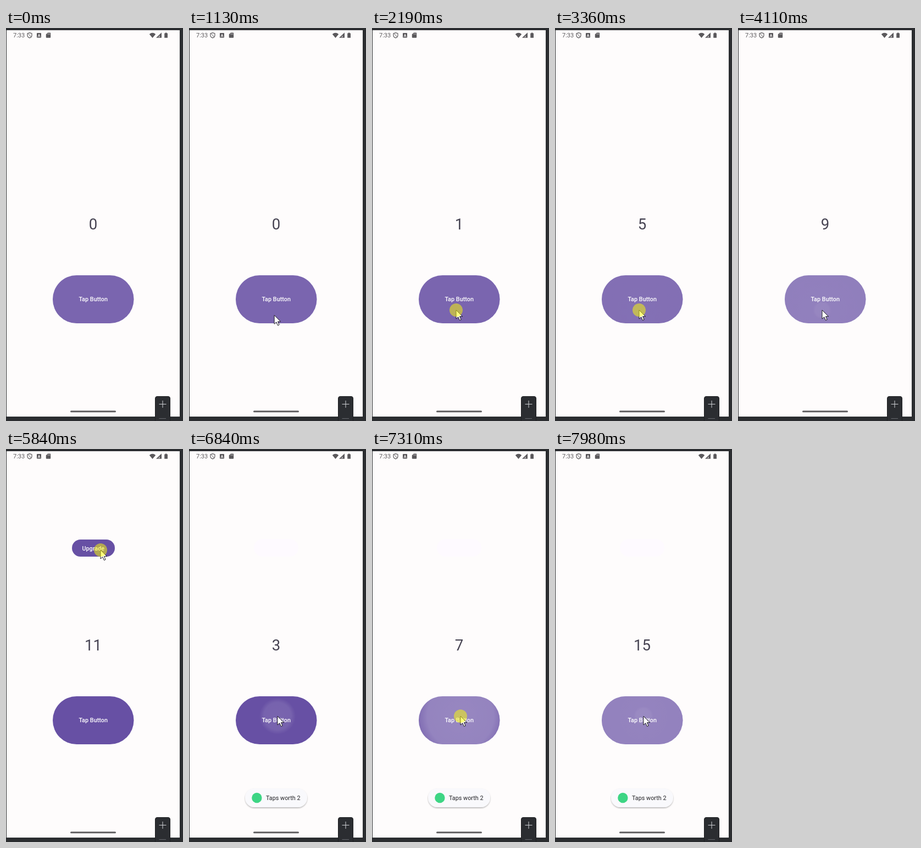
Write an HTML page that moves like this. It is 322 px wide and 712 px high and loops after 8000 ms.

```html
<!DOCTYPE html>
<html lang="en">
<head>
<meta charset="utf-8">
<title>Tap counter</title>
<style>
  html, body { margin: 0; width: 100%; height: 100%; overflow: hidden; background: #2b2d30; }
  svg { display: block; width: 322px; height: 712px; }
  text { font-family: Roboto, "Open Sans", sans-serif; }
  .label { font-size: 10.7px; font-weight: 500; letter-spacing: .08px; fill: #fff; text-anchor: middle; }
  #count { font-size: 27.6px; fill: #464352; text-anchor: middle; }
  .status { fill: #5b595c; }
</style>
</head>
<body>
<svg viewBox="0 0 322 712">
  <defs>
    <radialGradient id="glow">
      <stop offset="0" stop-color="#fff"/>
      <stop offset=".75" stop-color="#fff" stop-opacity=".9"/>
      <stop offset="1" stop-color="#fff" stop-opacity="0"/>
    </radialGradient>
    <clipPath id="tapClip"><rect x="85" y="448" width="147.5" height="87" rx="43.5"/></clipPath>
    <clipPath id="upClip"><rect x="120" y="164" width="78" height="31" rx="15.5"/></clipPath>
    <filter id="shadow" x="-10%" y="-20%" width="120%" height="160%">
      <feDropShadow dx="0" dy="1.5" stdDeviation="1.3" flood-color="#000" flood-opacity=".3"/>
    </filter>
  </defs>

  <rect width="322" height="712" fill="#2b2d30"/>
  <rect x="1" y="4" width="315" height="700" fill="#fefcfc"/>

  <!-- status bar -->
  <g class="status">
    <text x="13" y="17" font-size="11">7:33</text>
    <path d="M43 8.6 47 10v3.2c0 2.2-1.6 3.9-4 4.7-2.4-.8-4-2.5-4-4.7V10z" fill="none" stroke="#5b595c" stroke-width="1.2"/>
    <path d="M40.5 10.5 45.5 16" stroke="#5b595c" stroke-width="1"/>
    <rect x="56" y="9" width="8" height="8.5" rx="1"/>
    <text x="60" y="15.8" font-size="7" font-weight="700" text-anchor="middle" style="fill:#fefcfc">A</text>
    <path d="M76 8.5h4.2q1 0 1 1v7.3q0 1-1 1h-6.4q-1 0-1-1V11.5z"/>
    <path d="M76 10v1.8M77.8 10v1.8M79.5 10v1.8" stroke="#fefcfc" stroke-width=".6"/>
    <path d="M260.8 11.2Q266.5 6.4 272.2 11.2L266.5 18z"/>
    <path d="M273 17.8 283 8.3V17.8z"/>
    <path d="M276.5 16.8 280 13.5V16.8z" fill="#b5b3b6"/>
    <path d="M288.2 9.5h1.6V8.4h2.6v1.1h1.6v8.3h-5.8z"/>
  </g>

  <rect x="117" y="693.3" width="83" height="3" rx="1.5" fill="#605f61"/>

  <text id="count" x="158.5" y="364.6">0</text>

  <g clip-path="url(#tapClip)">
    <rect x="85" y="448" width="148" height="87" fill="#6750a4"/>
    <rect id="state" x="85" y="448" width="148" height="87" fill="#fff"/>
    <g id="ripples"></g>
  </g>
  <text class="label" x="158.7" y="495.4">Tap Button</text>

  <rect id="ghost" x="118" y="163" width="81" height="32" rx="16" fill="#fefaff"/>
  <g id="upgrade">
    <g clip-path="url(#upClip)">
      <rect x="120" y="164" width="78" height="31" fill="#6750a4"/>
      <circle id="upRipple" cx="172" cy="183" fill="url(#glow)"/>
    </g>
    <text class="label" x="158.8" y="183.8">Upgrade</text>
  </g>

  <g id="toast">
    <rect x="102" y="615" width="113" height="34" rx="17" fill="#f9f9fc" filter="url(#shadow)"/>
    <circle cx="123.4" cy="632" r="9.2" fill="#3dd584"/>
    <text x="140" y="636" font-size="10.8" fill="#222226">Taps worth 2</text>
  </g>

  <!-- zoom panel -->
  <rect x="271.5" y="667.5" width="27" height="50" rx="3.5" fill="#2b2d31" stroke="#1f2023"/>
  <path d="M278.5 681.5h13M285 675v13" stroke="#d0d1d6"/>
  <path d="M278.5 707.5h12.5" stroke="#66686e"/>

  <path id="cursor" d="M0 0V16L3.8 12.6 6.5 18.6 9.1 17.4 6.5 11.6H11.6z" fill="#fff" stroke="#1c1a22" stroke-width="1" stroke-linejoin="round"/>
  <circle id="press" r="12" fill="#ff0" fill-opacity=".5"/>
</svg>
<script>
const LOOP = 8000;
const $ = id => document.getElementById(id);
const set = (el, attrs) => { for (const k in attrs) el.setAttribute(k, attrs[k]); };
const show = (el, on) => el.setAttribute('visibility', on ? 'visible' : 'hidden');
const ramp = (t, a, b) => Math.min(1, Math.max(0, (t - a) / (b - a)));
const smooth = p => p * p * (3 - 2 * p);

const UPGRADE_ON = 4330, UPGRADE_PRESS = 5840, UPGRADE_UP = 5970, UPGRADE_OFF = 6080;

// Times at which the counter changes
const slowTaps = [1810, 2240, 2520, 2790, 3060, 3400, 3640, 3870, 4100, 4330, 4560];
const fastTaps = Array.from({ length: 7 }, (_, i) => 6790 + 196 * i);
const taps = [
  ...slowTaps.map((at, i) => ({ at, down: i ? at - 80 : 1650, x: 153, y: 511, worth: 1 })),
  ...fastTaps.map(at => ({ at, down: at - 80, x: 161, y: 484, worth: 2 }))
];

// Cursor legs: start, end, from, to
const legs = [
  [390, 650, 274, 694, 169, 582],
  [930, 1190, 169, 582, 153, 511],
  [4620, 4880, 153, 511, 203, 158],
  [5020, 5110, 203, 158, 205, 154],
  [5170, 5510, 205, 154, 172, 183],
  [6170, 6500, 172, 183, 161, 484]
];

for (const tap of taps) {
  tap.el = document.createElementNS('http://www.w3.org/2000/svg', 'circle');
  set(tap.el, { cx: tap.x, cy: tap.y, fill: 'url(#glow)' });
  $('ripples').append(tap.el);
}

function ripple(el, age) {
  const live = age >= 0 && age < 360;
  show(el, live);
  if (!live) return;
  set(el, {
    r: 10 + 130 * ramp(age, 0, 225) ** 1.5,
    opacity: .2 * ramp(age, 0, 120) * (1 - ramp(age, 250, 360))
  });
}

function cursorAt(t) {
  const leg = legs.filter(l => t >= l[0]).pop();
  if (!leg) return null;
  const [a, b, x0, y0, x1, y1] = leg;
  const p = smooth(ramp(t, a, b));
  return [x0 + (x1 - x0) * p, y0 + (y1 - y0) * p];
}

function render(t) {
  let count = 0;
  for (const tap of taps) {
    if (t >= tap.at) count += tap.worth;
    ripple(tap.el, t - tap.at + 20);
  }
  if (t >= UPGRADE_OFF) count -= 10;
  $('count').textContent = count;

  const held = 1 - ramp(t, 5250, 5420) + ramp(t, 6960, 7100);
  set($('state'), { opacity: .12 * held });

  show($('upgrade'), t >= UPGRADE_ON && t < UPGRADE_OFF);
  show($('ghost'), t >= UPGRADE_OFF);
  ripple($('upRipple'), t - UPGRADE_UP);
  set($('toast'), { opacity: ramp(t, UPGRADE_OFF, 6250) });

  const pos = cursorAt(t);
  show($('cursor'), pos);
  const down = taps.some(k => t >= k.down && t < k.at) || (t >= UPGRADE_PRESS && t < UPGRADE_UP);
  show($('press'), pos && down);
  if (pos) {
    const move = `translate(${pos[0].toFixed(1)} ${pos[1].toFixed(1)})`;
    set($('cursor'), { transform: move });
    set($('press'), { transform: move });
  }
}

const start = performance.now();
function tick() {
  render((performance.now() - start) % LOOP);
  requestAnimationFrame(tick);
}
tick();
</script>
</body>
</html>
```
